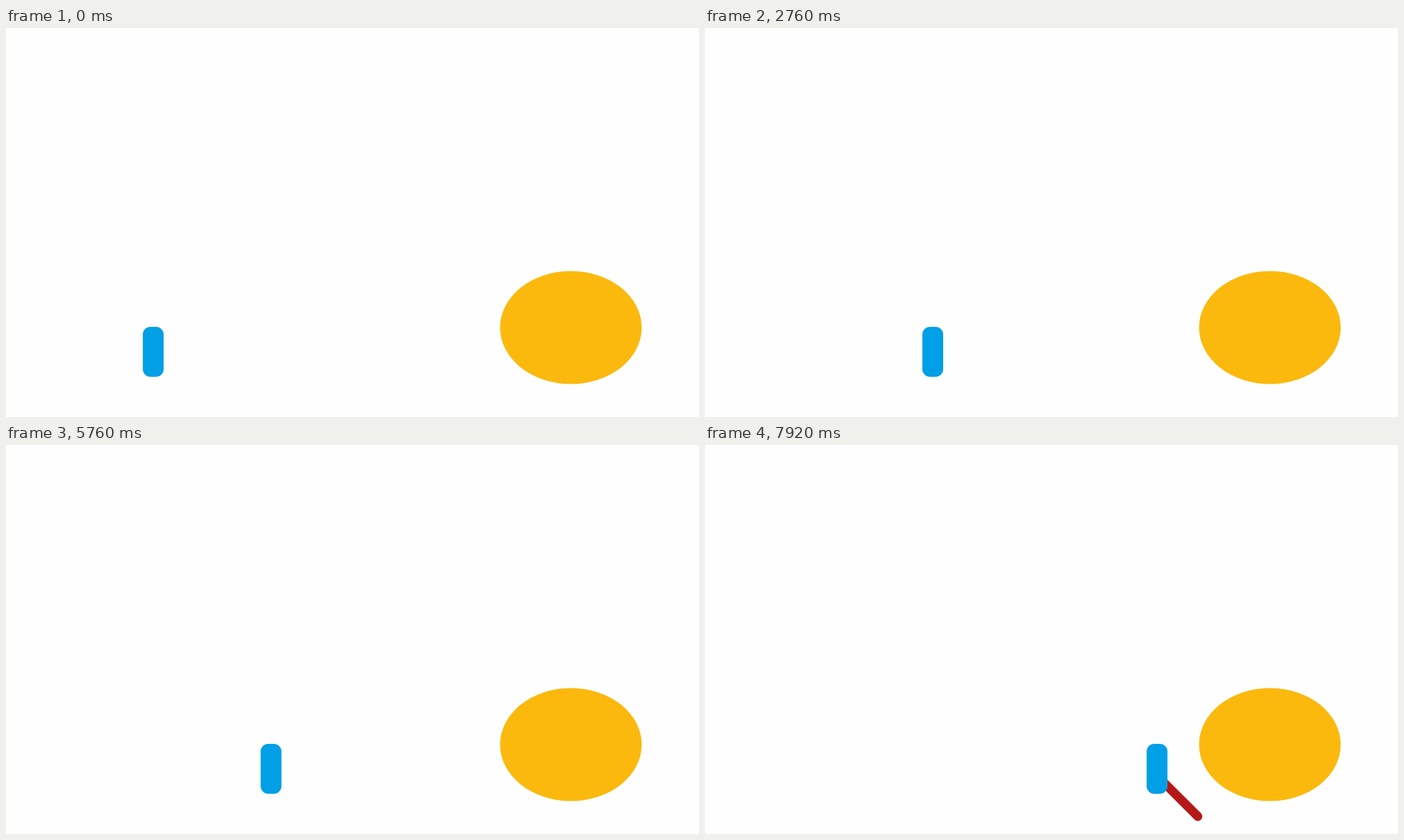
An HTML page with a canvas for the animation above (8 s loop, 998 px wide and 561 px high).

```html
<!DOCTYPE html>
<html lang="en">
<head>
<meta charset="utf-8">
<title>Duel</title>
<style>
  html, body { margin: 0; width: 100%; height: 100%; overflow: hidden; background: #fefefe; }
  canvas { display: block; }
</style>
</head>
<body>
<canvas id="stage" width="998" height="561"></canvas>
<script>
const ctx = document.getElementById('stage').getContext('2d');
const LOOP = 8000, STEP = 60, LAST_STEP = 7920;
const BLUE = '#009fe6', YELLOW = '#fbb90e', RED = '#b51917', BLACK = '#1d1d1d';
const BOSS = { x: 813.5, y: 432, rx: 102, ry: 81.5 };

// Player's left edge as [time, x], linear in between.
const WALK = [
  [0, 197], [110, 197], [1860, 437], [2760, 313], [3360, 224], [3545, 197],
  [3660, 197], [4920, 416], [5160, 449], [5765, 366], [5880, 383],
  [6300, 441], [6720, 497], [7560, 611], [7740, 636], [8000, 636]
];
const SHOTS = [372, 1267, 3707, 4602];
const TONGUE_PEAKS = [1877, 5217];
const SWINGS = [5417, 7740];

function along(path, t) {
  const i = Math.max(1, path.findIndex(p => p[0] >= t));
  const [t0, a] = path[i - 1], [t1, b] = path[i];
  return a + (b - a) * (t - t0) / (t1 - t0);
}

function box(x, y, w, h, r, color) {
  ctx.fillStyle = color;
  ctx.beginPath();
  ctx.roundRect(x, y, w, h, r);
  ctx.fill();
}

function drawSword(t, x) {
  for (const start of SWINGS) {
    const age = t - start;
    if (age < 0 || age > 200) continue;
    const angle = (-90 + 0.75 * age) * Math.PI / 180;
    ctx.strokeStyle = RED;
    ctx.lineWidth = 13;
    ctx.lineCap = 'round';
    ctx.beginPath();
    ctx.moveTo(x, 477);
    ctx.lineTo(x + 83 * Math.cos(angle), 477 + 83 * Math.sin(angle));
    ctx.stroke();
  }
}

function drawShots(t) {
  for (const start of SHOTS) {
    const x = BOSS.x - 1.967 * (t - start);
    if (t >= start && x > 2) box(x, 444.5, 18, 15, 3, BLACK);
  }
}

function drawTongue(t) {
  for (const peak of TONGUE_PEAKS) {
    const length = 613 * (1 - Math.abs(t - peak) / 300);
    if (length <= 0) continue;
    const tip = BOSS.x - length, bend = length * 0.052;
    ctx.fillStyle = RED;
    ctx.beginPath();
    ctx.ellipse(tip + bend, 452.5, bend, 7.5, 0, Math.PI / 2, Math.PI * 1.5);
    ctx.lineTo(BOSS.x, 445);
    ctx.lineTo(BOSS.x, 460);
    ctx.fill();
  }
}

function drawBoss(t) {
  const leap = Math.max(0, 1 - ((t - 6275) / 468) ** 2);
  const lift = t < 6740 ? 261 * leap : 0;
  ctx.fillStyle = YELLOW;
  ctx.beginPath();
  ctx.ellipse(BOSS.x, BOSS.y - lift, BOSS.rx, BOSS.ry, 0, 0, Math.PI * 2);
  ctx.fill();
}

function draw(now) {
  const t = Math.min(LAST_STEP, Math.floor(now % LOOP / STEP) * STEP);
  const x = along(WALK, t);
  ctx.fillStyle = '#fefefe';
  ctx.fillRect(0, 0, 998, 561);
  drawSword(t, x + 15);
  box(x, 431, 30, 72, 11, BLUE);
  drawShots(t);
  drawTongue(t);
  drawBoss(t);
}

const began = performance.now();
function tick() {
  draw(performance.now() - began);
  requestAnimationFrame(tick);
}
tick();
</script>
</body>
</html>
```
